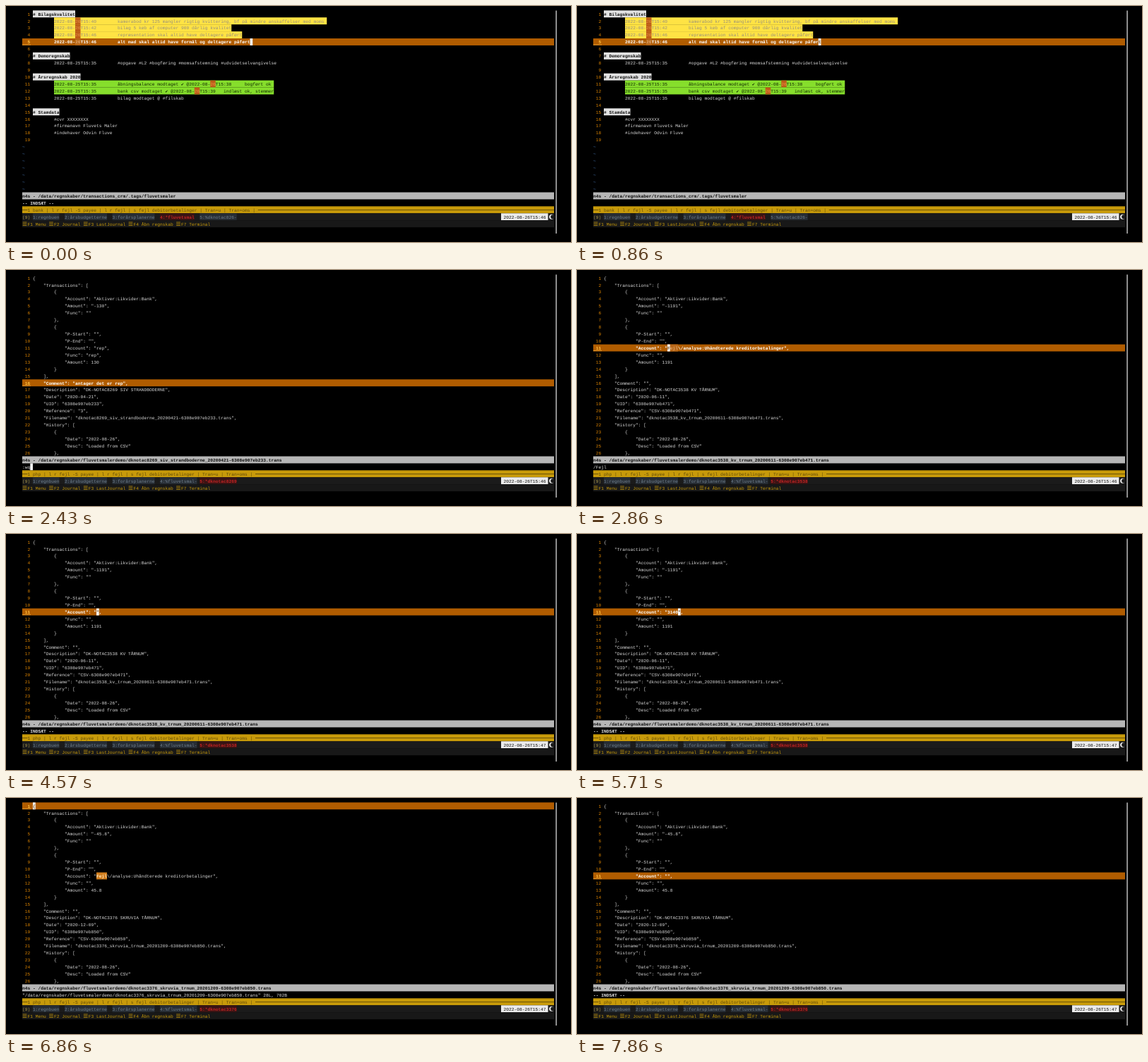
An HTML page with a canvas that plays this animation: 800x335 px, repeating every 8000 ms.

```html
<!DOCTYPE html>
<html lang="da">
<head>
<meta charset="utf-8">
<title>Terminal</title>
<style>
  html, body { margin: 0; width: 100%; height: 100%; overflow: hidden; background: #000; }
  canvas { display: block; width: 800px; height: 335px; }
</style>
</head>
<body>
<canvas id="stage" width="800" height="335"></canvas>
<script>
const ctx = document.getElementById('stage').getContext('2d');
const LOOP = 8000, BLINK = 565;
const LEFT = 23, RIGHT = 776, TOP = 6.3, CELL = 3.75, ROW = 9.93, GUTTER = 4;
const FONT = '6.25px "Liberation Mono", "DejaVu Sans Mono", monospace';
const INSERT = '-- INDSÆT --';
const TEXT = '#d6d6d6', GOLD = '#c79a0a', BAR = '#b05c00';

// ---- documents ----
const note = (date, text) => ' '.repeat(8) + date.padEnd(24) + text;
const yellow = { from: 8, bg: '#ffe344', fg: '#96907c' };
const green = { from: 8, bg: '#86de2c', fg: '#102800' };
const heading = { from: 0, bg: '#e2e2e2', fg: '#111', bold: true };

const notes = {
  path: '/data/regnskaber/transactions_crm/.tags/fluvetsmaler',
  pane: 'bank',
  id: '826',
  mark: /26(?=T)/g,
  tint: { 1: heading, 2: yellow, 3: yellow, 4: yellow, 7: heading, 10: heading, 11: green, 12: green, 15: heading },
  lines: () => [
    '# Bilagskvalitet',
    note('2022-08-26T15:40', 'kamerabod kr 125 mangler rigtig kvittering, bf på mindre anskaffelser med moms '),
    note('2022-08-26T15:42', 'bilag 5 køb af computer 900 dårlig kvalitet'),
    note('2022-08-26T15:46', 'repræsentation skal altid have deltagere påført'),
    note('2022-08-26T15:46', 'alt mad skal altid have formål og deltagere påført'),
    '',
    '# Demoregnskab',
    note('2022-08-25T15:35', '#opgave #L2 #bogføring #momsafstemning #udvidetselvangivelse'),
    '',
    '# Årsregnskab 2020',
    note('2022-08-25T15:35', 'åbningsbalance modtaget ✔ @2022-08-26T15:38'.padEnd(48) + 'bogført ok '),
    note('2022-08-25T15:35', 'bank csv modtaget ✔ @2022-08-26T15:39'.padEnd(40) + 'indlæst ok, stemmer'),
    note('2022-08-25T15:35', 'bilag modtaget @ #filskab'),
    '',
    '# Stamdata',
    note('#cvr XXXXXXXX', ''),
    note('#firmanavn Fluvets Maler', ''),
    note('#indehaver Odvin Fluve', ''),
    ''
  ]
};

const FAULT = 'Fejl\\/analyse:Uhåndterede kreditorbetalinger';

function transaction({ id, name, slug, date, uid, amount, account = FAULT, func = '', comment = '', ref }) {
  const file = `dknotac${id}_${slug}_${date.replace(/-/g, '')}-${uid}.trans`;
  const field = (depth, key, value, end = ',') => ' '.repeat(depth * 4) + `"${key}": "${value}"${end}`;
  return {
    path: '/data/regnskaber/fluvetsmalerdemo/' + file,
    pane: 'php', id, mark: /Fejl/g, tint: {},
    lines: edited => [
      '{',
      '    "Transactions": [',
      '        {',
      field(3, 'Account', 'Aktiver:Likvider:Bank'),
      field(3, 'Amount', '-' + amount),
      field(3, 'Func', '', ''),
      '        },',
      '        {',
      field(3, 'P-Start', ''),
      field(3, 'P-End', ''),
      field(3, 'Account', edited ?? account),
      field(3, 'Func', func),
      `            "Amount": ${amount}`,
      '        }',
      '    ],',
      field(1, 'Comment', comment),
      field(1, 'Description', `DK-NOTAC${id} ${name}`),
      field(1, 'Date', date),
      field(1, 'UID', uid),
      field(1, 'Reference', ref ?? 'CSV-' + uid),
      field(1, 'Filename', file),
      '    "History": [',
      '        {',
      field(3, 'Date', '2022-08-26'),
      field(3, 'Desc', 'Loaded from CSV', ''),
      '        },'
    ]
  };
}

const lunch = transaction({ id: '8269', name: 'SIV STRANDBODERNE', slug: 'siv_strandboderne', date: '2020-04-21',
  uid: '6308e907eb233', amount: '130', account: 'rep', func: 'rep', comment: 'antager det er rep', ref: '3' });
const invoice = transaction({ id: '3538', name: 'KV TÅRNUM', slug: 'kv_trnum', date: '2020-06-11',
  uid: '6308e907eb471', amount: '1191' });
const tools = transaction({ id: '3376', name: 'SKRUVIA TÅRNUM', slug: 'skruvia_trnum', date: '2020-12-09',
  uid: '6308e907eb850', amount: '45.8' });

const loaded = doc => `"${doc.path}" 28L, 702B`;

// ---- session: each step changes part of the state and restarts the blink ----
const steps = [
  [0, { doc: notes, line: 5, col: 82, cmd: INSERT, clock: '15:46' }],
  [290, { col: 81, cmd: '' }],
  [430, { cmd: ':' }],
  [570, { cmd: ':w' }],
  [710, { cmd: '' }],
  [1140, { doc: lunch, line: 16, col: 33, cmd: '1min' }],
  [2290, { cmd: ':' }],
  [2430, { cmd: ':wq' }],
  [2570, { doc: invoice, line: 1, col: 0, cmd: loaded(invoice) }],
  [2860, { line: 11, col: 24, cmd: '/Fejl' }],
  [4430, { account: '', cmd: INSERT, clock: '15:47' }],
  [5290, { account: '3', col: 25 }],
  [5430, { account: '31', col: 26 }],
  [5570, { account: '314', col: 27 }],
  [5710, { account: '3140', col: 28 }],
  [5860, { col: 27, cmd: '' }],
  [6000, { cmd: ':' }],
  [6140, { cmd: ':w' }],
  [6290, { cmd: ':wq' }],
  [6710, { doc: tools, account: undefined, line: 1, col: 0, cmd: loaded(tools) }],
  [7000, { cmd: '/' }],
  [7140, { line: 11, col: 24, cmd: '/Fejl' }],
  [7290, { account: '', cmd: INSERT }]
];

function stateAt(t) {
  const past = steps.filter(([at]) => at <= t);
  const state = Object.assign({}, ...past.map(([, change]) => change));
  const idle = t - past[past.length - 1][0];
  state.cursorOn = Math.floor(idle / BLINK) % 2 === 0;
  return state;
}

// ---- drawing ----
const cellX = col => LEFT + col * CELL;
const rowY = row => TOP + row * ROW;

function box(x, y, w, h, color) {
  ctx.fillStyle = color;
  ctx.fillRect(x, y, w, h);
}

const fill = (col, row, count, color) => box(cellX(col), rowY(row), count * CELL, ROW, color);
const fillRow = (row, color) => box(LEFT, rowY(row), RIGHT - LEFT, ROW, color);

function print(col, row, text, color, bold = false) {
  ctx.font = (bold ? 'bold ' : '') + FONT;
  ctx.fillStyle = color;
  [...text].forEach((ch, i) => {
    if (ch !== ' ') ctx.fillText(ch, cellX(col + i), rowY(row) + 7.3);
  });
}

function drawLine(doc, text, number, current) {
  const row = number - 1, tint = doc.tint[number];
  if (current) {
    fillRow(row, BAR);
    box(LEFT, rowY(row) + 8.5, 12, 0.9, '#e8a030');
  } else if (tint) {
    fill(GUTTER + tint.from, row, text.length - tint.from, tint.bg);
  }
  print(0, row, String(number).padStart(3), current ? '#ffc040' : '#d98200', current);
  const color = current ? '#fff' : tint ? tint.fg : TEXT;
  const bold = current || Boolean(tint && tint.bold);
  print(GUTTER, row, text, color, bold);
  for (const hit of text.matchAll(doc.mark)) {
    const col = GUTTER + hit.index, word = hit[0];
    fill(col, row, word.length, current ? '#b8681a' : tint ? '#bd5c18' : '#cf7c1c');
    print(col, row, word, current ? '#dca468' : tint ? '#e89848' : '#ffe4bc', !tint);
  }
}

function drawCursor(state, lines) {
  if (!state.cursorOn) return;
  const typing = /^(:|\/$)/.test(state.cmd);
  const row = typing ? 27 : state.line - 1;
  const col = typing ? state.cmd.length : GUTTER + state.col;
  fill(col, row, 1, '#f4f4f4');
  if (!typing) print(col, row, lines[row][state.col] || '', '#7a5020', true);
}

function drawPaneBar(doc) {
  const label = `1 ${doc.pane} | l r fejl -S payee | l r fejl | s fejl debitorbetalinger | Tran=u | Tran=oms |`;
  const ink = '#604a08', mid = rowY(28) + 4.8, end = cellX(label.length + 3);
  fillRow(28, GOLD);
  box(LEFT, mid, 2 * CELL, 0.9, ink);
  box(end, mid, RIGHT - end, 0.9, ink);
  print(2, 28, label, ink);
}

function drawWindows(doc, clock) {
  const inNotes = doc === notes;
  const tabs = [
    [4, '1:regnbuen'],
    [16, '2:årsbudgetterne'],
    [34, '3:forårsplanerne'],
    [52, inNotes ? '4:*fluvetsmal' : '4:%fluvetsmal-', inNotes],
    [67, inNotes ? '5:%dknotac826-' : '5:*dknotac' + doc.id, !inNotes]
  ];
  fillRow(29, '#1b1b1b');
  print(0, 29, '(9)', '#a8974a');
  for (const [col, name, active] of tabs) {
    fill(col, 29, name.length, active ? '#391414' : '#272d34');
    print(col, 29, name, active ? '#c32424' : '#71808f', active);
  }
  const y = rowY(29);
  box(701, y, 66.5, ROW, '#ececec');
  print((704.5 - LEFT) / CELL, 29, '2022-08-26T' + clock, '#111');
  const disc = (x, r, color) => {
    ctx.fillStyle = color;
    ctx.beginPath();
    ctx.arc(x, y + 5, r, 0, Math.PI * 2);
    ctx.fill();
  };
  disc(772.6, 3.5, '#eee');
  disc(774.2, 3, '#1b1b1b');
}

function drawKeys() {
  fillRow(30, '#181818');
  let col = 0;
  for (const key of ['F1 Menu', 'F2 Journal', 'F3 LastJournal', 'F4 Åbn regnskab', 'F7 Terminal']) {
    for (let i = 0; i < 3; i++) box(cellX(col) + 0.6, rowY(30) + 2.4 + i * 2.2, 5.8, 0.8, GOLD);
    print(col + 2, 30, key, GOLD);
    col += key.length + 3;
  }
}

function draw(t) {
  const state = stateAt(t), { doc, cmd } = state;
  const lines = doc.lines(state.account);
  box(0, 0, 800, 335, '#000');
  box(778.2, 6.5, 1.8, 316.5, '#9c9c9c');
  lines.forEach((text, i) => drawLine(doc, text, i + 1, i + 1 === state.line));
  for (let row = lines.length; row < 26; row++) print(0, row, '~', '#4f86cc');
  fillRow(26, '#b6b6b6');
  print(0, 26, 'n4s - ' + doc.path, '#0c0c0c', true);
  print(0, 27, cmd, '#e0e0e0', cmd === INSERT);
  drawCursor(state, lines);
  drawPaneBar(doc);
  drawWindows(doc, state.clock);
  drawKeys();
}

ctx.textRendering = 'geometricPrecision';
const start = performance.now();
function tick() {
  draw((performance.now() - start) % LOOP);
  requestAnimationFrame(tick);
}
tick();
</script>
</body>
</html>
```
